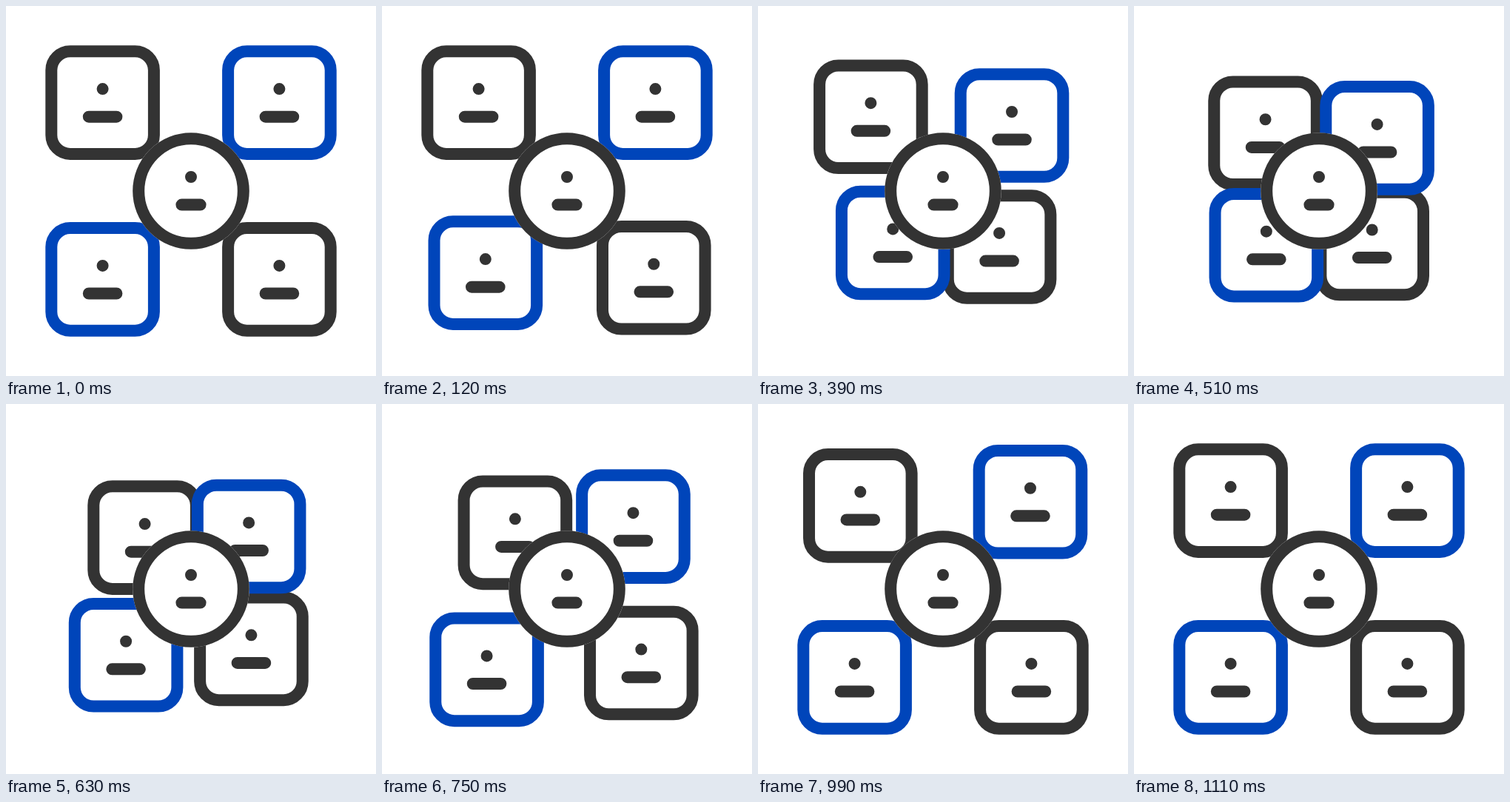
Animation of 500x500 px, one loop 1500 ms. Source, as an HTML page:

```html
<!DOCTYPE html>
<html lang="en">
<head>
<meta charset="utf-8">
<title>Orbiting cards</title>
<style>
  html, body { margin: 0; width: 100%; height: 100%; overflow: hidden; background: #fff; }
  svg { display: block; width: 100%; height: 100%; }
</style>
</head>
<body>
<svg viewBox="0 0 500 500" fill="none" stroke="#333" stroke-width="16" stroke-linecap="round">
  <defs>
    <g id="card">
      <rect x="-69.3" y="-69.3" width="138.6" height="138.6" rx="25.5" fill="#fff"/>
      <g stroke="#333">
        <path d="M0-18.5h0M-18.8 19.1h37.6"/>
      </g>
    </g>
  </defs>
  <g id="cards"></g>
  <circle cx="250" cy="250" r="78.8" fill="#fff" stroke="none"/>
  <circle cx="250" cy="250" r="70.8"/>
  <path d="M250 231h0M237.4 268.6h25.2"/>
</svg>
<script>
const STEP = 30, FRAMES = 50, RISE = 14, FALL = 16;
const NEAR = 130.6, FAR = 369.4, DARK = '#333', BLUE = '#0045ba';

// Back to front: resting centre, peak offset, first frame of the move
const cards = [
  { x: NEAR, y: NEAR, dx: 57, dy: 50, start: 7, color: DARK },
  { x: FAR, y: FAR, dx: -48.1, dy: -48.8, start: 2, color: DARK },
  { x: FAR, y: NEAR, dx: -42.7, dy: 50, start: 5, color: BLUE },
  { x: NEAR, y: FAR, dx: 52.2, dy: -50, start: 0, color: BLUE }
];

const group = document.getElementById('cards');
for (const card of cards) {
  card.el = document.createElementNS('http://www.w3.org/2000/svg', 'use');
  card.el.setAttribute('href', '#card');
  card.el.setAttribute('stroke', card.color);
  group.append(card.el);
}

// cubic-bezier(.4, 0, .6, 1)
function ease(x) {
  if (x <= 0) return 0;
  if (x >= 1) return 1;
  let lo = 0, hi = 1, u;
  for (let i = 0; i < 24; i++) {
    u = (lo + hi) / 2;
    const bx = 1.2 * u * (1 - u) ** 2 + 1.8 * u * u * (1 - u) + u ** 3;
    if (bx < x) lo = u; else hi = u;
  }
  return u * u * (3 - 2 * u);
}

function draw(now) {
  const frame = Math.floor(now / STEP) % FRAMES;
  for (const { el, x, y, dx, dy, start } of cards) {
    const f = frame - start;
    const k = f < RISE ? ease(f / RISE) : 1 - ease((f - RISE) / FALL);
    el.setAttribute('transform', `translate(${x + dx * k} ${y + dy * k})`);
  }
}

let begin;
function tick(now) {
  begin ??= now;
  draw(now - begin);
  requestAnimationFrame(tick);
}
draw(0);
requestAnimationFrame(tick);
</script>
</body>
</html>
```
